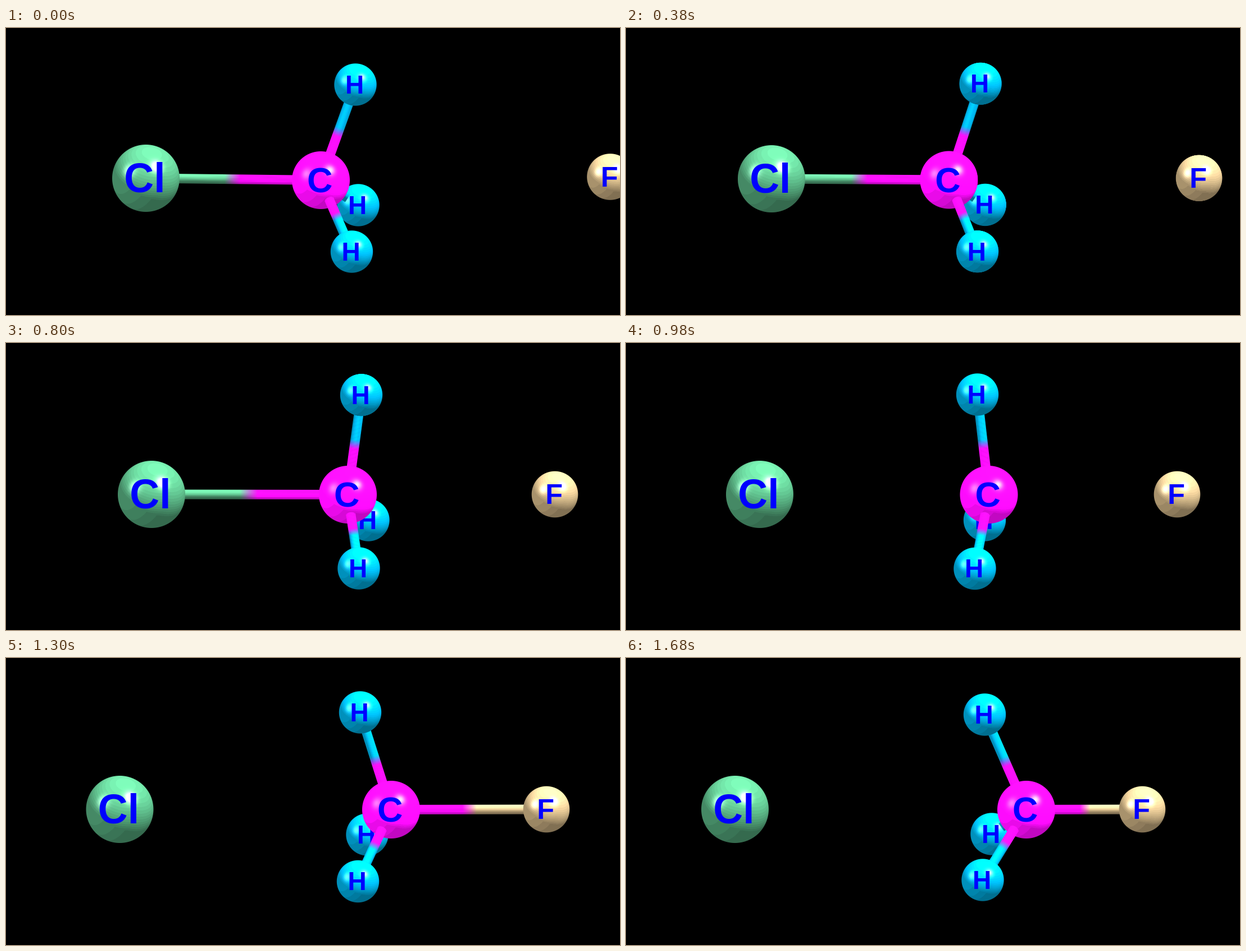
These frames come from a looping animation (1093x512 px, 1700 ms). An HTML page with a canvas:

```html
<!DOCTYPE html>
<html lang="en">
<head>
<meta charset="utf-8">
<title>Substitution reaction</title>
<style>
html, body { margin: 0; width: 100%; height: 100%; overflow: hidden; background: #000; }
canvas { display: block; }
</style>
</head>
<body>
<canvas id="stage" width="1093" height="512"></canvas>
<script>
const LOOP = 1700, STEP = 20;
const BREAK_AT = 880, FORM_AT = 1120;   // when the old bond goes and the new one appears
const BOND_R = 8.5, STRIPS = 9;
const ctx = document.getElementById('stage').getContext('2d');

// Atom centres at these times (ms)
const times = [0, 200, 560, 800, 980, 1080, 1300, 1680];
const GREEN = [95, 190, 140], PINK = [350, 15, 350], SAND = [232, 202, 150], BLUE = [0, 200, 260];
const atoms = {
  cl: { label: 'Cl', r: 60, base: GREEN,
    x: [249, 254.5, 262, 259, 238, 220.5, 202.5, 194],
    y: [268, 268, 270, 270, 270, 270, 270, 270] },
  c: { label: 'C', r: 51.5, base: PINK,
    x: [560.5, 567.5, 584.5, 608.5, 646, 664, 685.5, 712.5],
    y: [271.5, 271.5, 270.5, 270.5, 270.5, 270.5, 270.5, 270.5] },
  f: { label: 'F', r: 41.3, base: SAND,
    x: [1075.5, 1045.5, 997, 977, 981, 979, 962, 919],
    y: [265.5, 266, 269.5, 270, 270, 270, 270, 270] },
  top: { label: 'H', r: 37.7, base: BLUE,
    x: [622, 628, 633, 632.5, 625.5, 625, 630.5, 638.5],
    y: [101, 101, 97, 92.7, 92, 93.5, 97, 101] },
  back: { label: 'H', r: 37.7, base: BLUE,
    x: [627, 633, 644.5, 645, 638.5, 638.5, 643, 651],
    y: [316, 316, 315, 316, 316, 316, 315, 314] },
  front: { label: 'H', r: 37.7, base: BLUE,
    x: [615.5, 621.5, 628.5, 628, 621, 621, 626.5, 635],
    y: [399, 399, 399, 402, 402.5, 401.7, 398.5, 396] }
};

// Smooth curve through the keys (cubic Hermite)
function curve(v, t) {
  const last = times.length - 1;
  let i = 0;
  while (i < last - 1 && t >= times[i + 1]) i++;
  const slope = k => {
    const a = Math.max(k - 1, 0), b = Math.min(k + 1, last);
    return (v[b] - v[a]) / (times[b] - times[a]);
  };
  const h = times[i + 1] - times[i], u = (t - times[i]) / h, w = 1 - u;
  return v[i] * (1 + 2 * u) * w * w + v[i + 1] * u * u * (3 - 2 * u)
    + h * u * w * (slope(i) * w - slope(i + 1) * u);
}

// Lighting: normals have y up and z towards the viewer
const facing = (n, d) => Math.max(0, n[0] * d[0] + n[1] * d[1] + n[2] * d[2]);

function light(n) {
  const sum = 0.57 + 0.72 * facing(n, [0.4, 0.75, 0.53]) + 0.18 * facing(n, [-0.8, 0.3, 0.5]);
  return Math.round(sum * 18) / 18;
}

const shade = (base, n) => `rgb(${base.map(v => Math.min(255, v * light(n)))})`;

function makeBall({ r, base }) {
  const size = Math.ceil(r + 2) * 4, mid = size / 2;
  const ball = document.createElement('canvas');
  ball.width = ball.height = size;
  const g = ball.getContext('2d'), image = g.createImageData(size, size);
  const warm = [235, 225, 170];
  for (let py = 0; py < size; py++) for (let px = 0; px < size; px++) {
    const x = (px + 0.5 - mid) / (2 * r), y = (mid - py - 0.5) / (2 * r);
    const d = Math.hypot(x, y);
    if (d > 1.05) continue;
    const k = Math.max(1, d), n = [x / k, y / k, Math.sqrt(Math.max(0, 1 - d * d))];
    const main = facing(n, [0.32, 0.35, 0.88]) ** 65;
    const side = facing(n, [-0.5, 0.22, 0.838]) ** 55;
    const at = (py * size + px) * 4, l = light(n);
    for (let c = 0; c < 3; c++)
      image.data[at + c] = Math.min(255, base[c] * l) + warm[c] * main + 110 * side;
    image.data[at + 3] = 255 * Math.min(1, Math.max(0, (1 - d) * 2 * r + 0.5));
  }
  g.putImageData(image, 0, 0);
  return ball;
}

for (const a of Object.values(atoms)) a.ball = makeBall(a);

function drawBall(a) {
  const size = a.ball.width / 2;
  ctx.drawImage(a.ball, a.px - size / 2, a.py - size / 2, size, size);
}

function drawLabel(a) {
  ctx.font = `bold ${a.r * 1.22}px "Liberation Sans", Arial, sans-serif`;
  ctx.textAlign = 'center';
  ctx.fillStyle = '#00f';
  ctx.fillText(a.label, a.px - a.r * 0.035, a.py + a.r * 0.42);
}

function drawAtom(a) {
  drawBall(a);
  drawLabel(a);
}

// Cylinder from the carbon; tilt is the sine of its lean towards the viewer
function drawBond(to, tilt = 0, from = 0, end = 1) {
  const c = atoms.c, dx = to.px - c.px, dy = to.py - c.py;
  const len = Math.hypot(dx, dy), cos = dx / len, sin = dy / len;
  const flat = Math.sqrt(1 - tilt * tilt), thick = 2 * BOND_R / STRIPS;
  ctx.save();
  ctx.translate(c.px, c.py);
  ctx.rotate(Math.atan2(dy, dx));
  for (let i = 0; i < STRIPS; i++) {
    const s = (2 * i + 1) / STRIPS - 1, z = Math.sqrt(1 - s * s);
    const n = [-sin * s - cos * tilt * z, -cos * s + sin * tilt * z, flat * z];
    const paint = ctx.createLinearGradient(0, 0, len, 0);
    paint.addColorStop(0.46, shade(c.base, n));
    paint.addColorStop(0.55, shade(to.base, n));
    ctx.fillStyle = paint;
    const start = from * len - BOND_R * tilt * z;
    const overlap = i < STRIPS - 1 ? 0.5 : 0;
    ctx.fillRect(start, -BOND_R + i * thick, end * len - start, thick + overlap);
  }
  ctx.restore();
}

function draw(t) {
  for (const a of Object.values(atoms)) {
    a.px = curve(a.x, t);
    a.py = curve(a.y, t);
  }
  const { cl, c, f, top, back, front } = atoms;
  ctx.fillStyle = '#000';
  ctx.fillRect(0, 0, 1093, 512);
  if (t < BREAK_AT) drawBond(cl);
  if (t >= FORM_AT) drawBond(f);
  drawBond(top);
  drawBall(back);
  drawBond(back, -0.9, 0, 0.72);
  drawLabel(back);
  [c, cl, f, top].forEach(drawAtom);
  drawBond(front, 0.64, 0.28);
  drawAtom(front);
}

const begin = performance.now();
function tick() {
  const t = (performance.now() - begin) % LOOP;
  draw(Math.floor(t / STEP) * STEP);
  requestAnimationFrame(tick);
}
tick();
</script>
</body>
</html>
```
